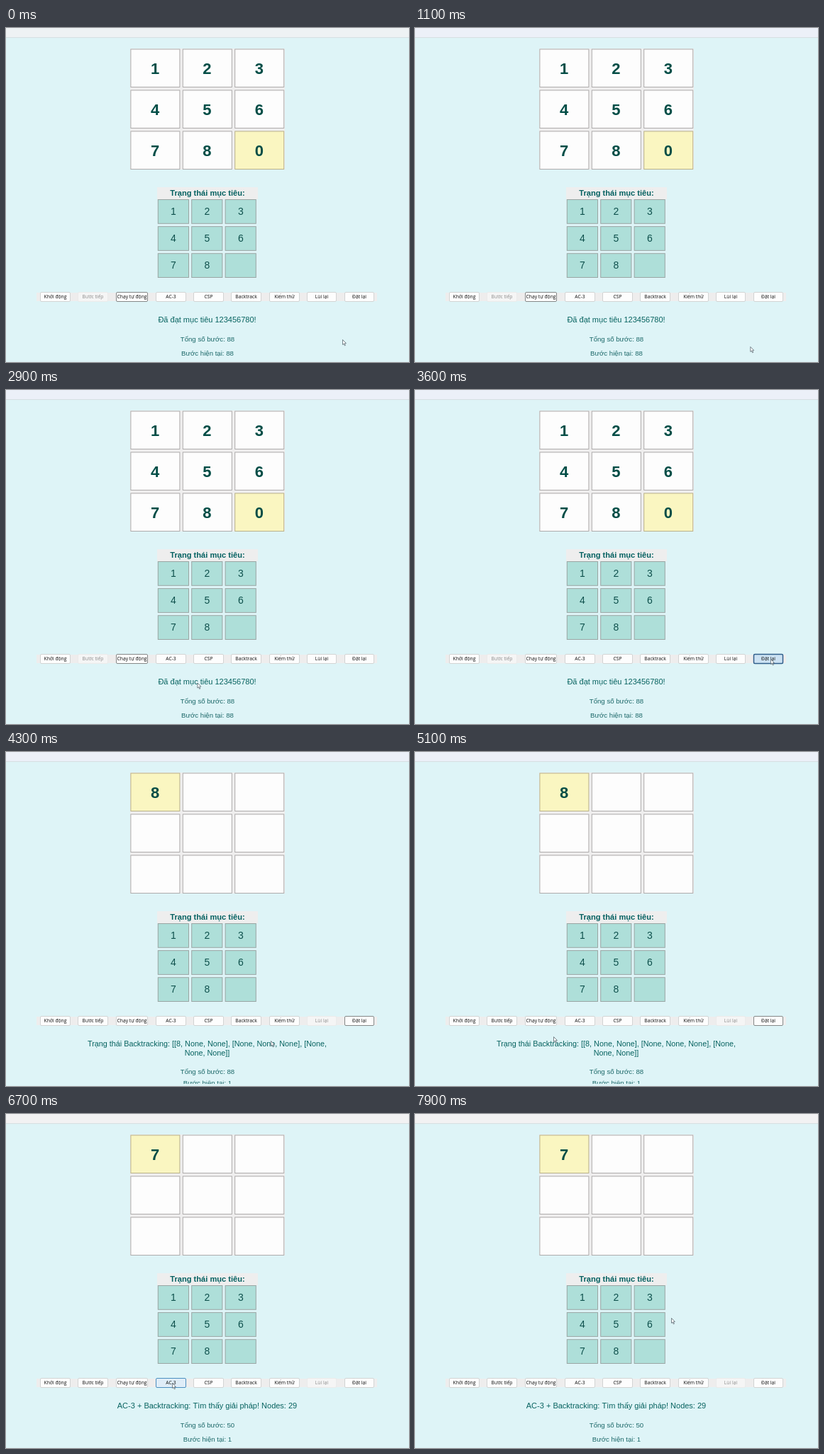
An HTML page with a canvas that plays this animation: 568 px wide and 472 px high, repeating every 8000 ms.

```html
<!DOCTYPE html>
<html lang="vi">
<head>
<meta charset="utf-8">
<style>
html, body { margin: 0; width: 100%; height: 100%; overflow: hidden; background: #def4f7; }
canvas { display: block; }
</style>
</head>
<body>
<canvas id="stage" width="568" height="472"></canvas>
<script>
const ctx = document.getElementById('stage').getContext('2d');
const LOOP = 8000, STEP = 100;
const SANS = '"Liberation Sans", Arial, sans-serif';
const UI = '"Open Sans", "Noto Sans", sans-serif';

// Moments at which the window changes state
const PRESS_RESET = 3500, RESET = 3700, PRESS_AC3 = 5800, SOLVED = 5900;

// Pointer path: time, x, y
const path = [
  [0, 474, 440], [600, 474, 440], [1000, 484, 450], [1400, 409, 450],
  [1800, 409, 450], [2100, 237, 418], [2600, 182, 381], [2700, 182, 381],
  [3000, 300, 425], [3400, 501, 380], [4000, 501, 380], [4300, 373, 408],
  [4800, 212, 406], [5100, 195, 402], [5600, 234, 380], [6700, 234, 380],
  [7100, 290, 420], [7400, 384, 350], [7800, 361, 288], [LOOP, 361, 288]
];

const buttons = [
  ['Khởi động', 48, 43], ['Bước tiếp', 101, 43], ['Chạy tự động', 155, 45],
  ['AC-3', 211, 43], ['CSP', 264, 43], ['Backtrack', 317, 43],
  ['Kiểm thử', 371, 43], ['Lùi lại', 424, 42], ['Đặt lại', 477, 42]
];

function pointerAt(t) {
  const i = path.findIndex(p => p[0] > t);
  const [t0, x0, y0] = path[i - 1], [t1, x1, y1] = path[i];
  const u = (t - t0) / (t1 - t0), e = u * u * (3 - 2 * u);
  return [x0 + (x1 - x0) * e, y0 + (y1 - y0) * e];
}

function rect(x, y, w, h, fill) {
  ctx.fillStyle = fill;
  ctx.fillRect(x, y, w, h);
}

function box(x, y, w, h, fill, border) {
  rect(x, y, w, h, border);
  rect(x + 1, y + 1, w - 2, h - 2, fill);
}

function text(str, x, y, font, color) {
  ctx.font = font;
  ctx.fillStyle = color;
  ctx.textAlign = 'center';
  ctx.fillText(str, x, y);
}

function drawBoard(digits, active) {
  rect(175, 29, 218, 171, '#efeeee');
  for (let i = 0; i < 9; i++) {
    const x = 175.4 + (i % 3) * 73.4, y = 29.5 + Math.floor(i / 3) * 58;
    const lit = i === active;
    box(x, y, 70, 54.5, lit ? '#faf6c1' : '#fdfdfd', lit ? '#b9b18a' : '#adabab');
    text(digits[i] || '', x + 34.6, y + 35, `bold 22px ${SANS}`, '#024d46');
  }
}

function drawGoal() {
  rect(213, 225, 142, 17, '#eeeeee');
  text('Trạng thái mục tiêu:', 284, 237, `bold 11.1px ${SANS}`, '#046060');
  for (let i = 0; i < 9; i++) {
    const x = 213.8 + (i % 3) * 47.4, y = 242 + Math.floor(i / 3) * 38.1;
    box(x, y, 44.2, 34.8, '#aedfd9', '#9aa5a3');
    if (i < 8) text(i + 1, x + 22.2, y + 22, `14px ${SANS}`, '#0e504c');
  }
}

function drawButtons(t, [px, py]) {
  const disabled = t < RESET ? 'Bước tiếp' : 'Lùi lại';
  const focused = t < PRESS_RESET ? 'Chạy tự động' : t < PRESS_AC3 ? 'Đặt lại' : '';
  const pressed = (t >= PRESS_RESET && t < RESET) || (t >= PRESS_AC3 && t < SOLVED);
  rect(43, 374, 480, 12, '#eeeded');
  for (const [label, x, w] of buttons) {
    const off = label === disabled;
    const hover = !off && px >= x && px < x + w && py >= 373 && py < 387;
    let fill = '#fdfdfd', border = '#d2d4d4';
    if (off) [fill, border] = ['#f5f5f5', '#eaebeb'];
    else if (hover && pressed) [fill, border] = ['#cce2f3', '#315f8c'];
    else if (hover) [fill, border] = ['#dfedf8', '#4b8fc0'];
    else if (label === focused) border = '#858888';
    ctx.beginPath();
    ctx.roundRect(x + .5, 373.5, w - 1, 13, 1.5);
    ctx.fillStyle = fill;
    ctx.fill();
    ctx.lineWidth = hover && pressed ? 1.5 : 1;
    ctx.strokeStyle = border;
    ctx.stroke();
    text(label, x + w / 2, 382.3, `6.75px ${UI}`, off ? '#8c8c8c' : '#101010');
  }
}

function drawStatus(t) {
  const status = (str, y, size = 11) => text(str, 283.5, y, `${size}px ${SANS}`, '#06625f');
  const count = (str, y) => text(str, 284, y, `9.65px ${SANS}`, '#1c6869');
  if (t >= RESET && t < SOLVED) {
    status('Trạng thái Backtracking: [[8, None, None], [None, None, None], [None,', 416, 10.8);
    status('None, None]]', 429, 10.8);
    count('Tổng số bước: 88', 455);
    // The last row is squeezed against the window edge
    ctx.save();
    ctx.beginPath();
    ctx.rect(200, 464.5, 170, 4.5);
    ctx.clip();
    count('Bước hiện tại: 1', 470.5);
    ctx.restore();
    return;
  }
  const solved = t >= SOLVED;
  status(solved ? 'AC-3 + Backtracking: Tìm thấy giải pháp! Nodes: 29'
                : 'Đã đạt mục tiêu 123456780!', 416);
  count('Tổng số bước: ' + (solved ? 50 : 88), 442.5);
  count('Bước hiện tại: ' + (solved ? 1 : 88), 462.5);
}

function drawPointer([x, y]) {
  ctx.save();
  ctx.translate(x + .5, y + .5);
  ctx.beginPath();
  [[0, 0], [0, 7], [1.6, 5.6], [2.8, 8.4], [3.9, 7.9], [2.8, 5.2], [4.9, 5]]
    .forEach(p => ctx.lineTo(...p));
  ctx.closePath();
  ctx.fillStyle = '#fff';
  ctx.fill();
  ctx.lineWidth = .8;
  ctx.strokeStyle = '#5a6870';
  ctx.stroke();
  ctx.restore();
}

function draw(t) {
  const pointer = pointerAt(t);
  rect(0, 0, 568, 472, '#def4f7');
  rect(0, 0, 568, 13, t < 600 ? '#eef2f4' : t < SOLVED ? '#ecf0f8' : '#f2f2f3');
  rect(0, 13, 568, 1, '#d6dfe2');
  if (t < RESET) drawBoard('123456780', 8);
  else drawBoard(t < SOLVED ? '8' : '7', 0);
  drawGoal();
  drawButtons(t, pointer);
  drawStatus(t);
  drawPointer(pointer);
}

const start = performance.now();
function tick() {
  const t = (performance.now() - start) % LOOP;
  draw(Math.floor(t / STEP) * STEP);
  requestAnimationFrame(tick);
}
tick();
</script>
</body>
</html>
```
